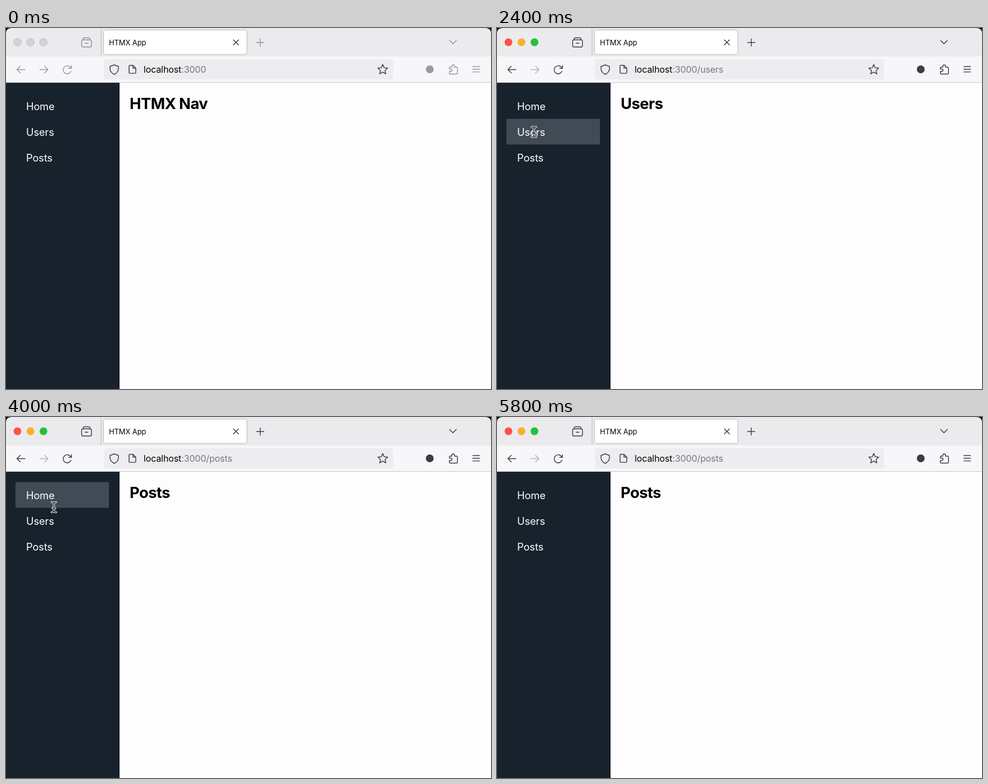
An HTML page for the animation above (5900 ms loop, 867 by 646 pixels).

```html
<!DOCTYPE html>
<html lang="en">
<head>
<meta charset="utf-8">
<title>HTMX App</title>
<style>
  html, body { margin: 0; width: 100%; height: 100%; overflow: hidden; background: #000; }
  svg { display: block; width: 867px; height: 646px; font-family: Inter, sans-serif; }
  .icon { fill: none; stroke: #3c3c42; stroke-width: 1.45; stroke-linecap: round; stroke-linejoin: round; }
  .nav { fill: #fff; font-size: 18.3px; letter-spacing: -.1px; }
</style>
</head>
<body>
<svg viewBox="0 0 867 646">
  <defs>
    <filter id="shadow" x="-5%" y="-20%" width="110%" height="140%">
      <feDropShadow dx="0" dy="0" stdDeviation="1.6" flood-color="#55555c" flood-opacity=".65"/>
    </filter>
    <clipPath id="window"><path d="M0 646V10Q0 0 10 0H857Q867 0 867 10V646Z"/></clipPath>
  </defs>
  <rect width="867" height="646"/>
  <g clip-path="url(#window)">
    <rect width="867" height="51" fill="#ebebee"/>
    <rect y="51" width="867" height="46" fill="#f7f7fa"/>
    <rect y="97" width="867" height="1" fill="#cbc8d3"/>
    <rect y="98" width="867" height="548" fill="#fdfdfd"/>
    <rect y="98" width="203" height="548" fill="#18222d"/>

    <g id="lights"></g>
    <path d="M170 0V50" stroke="#b9b9ae"/>
    <rect x="175" y="4.5" width="255" height="42" rx="4" fill="#fff" filter="url(#shadow)"/>
    <text x="184" y="31" font-size="13" letter-spacing="-.1">HTMX App</text>
    <path class="icon" d="M406.5 21.2l9 9m0-9l-9 9"/>
    <rect x="175" y="56" width="517" height="36" rx="4" fill="#ededf0"/>

    <g id="tools" class="icon">
      <path d="M138 20.5V19.5Q138 17.5 140 17.5H148Q150 17.5 150 19.5V20.5M141.5 27.3H146.5"/>
      <rect x="135.3" y="21.3" width="17.4" height="12.7" rx="2.2"/>
      <path d="M448 26H461M454.5 19.5V32.5"/>
      <path d="M793 22.2l6 6 6-6"/>
      <path d="M34 74.5H19.5m6-6l-6 6 6 6"/>
      <path d="M116.2 77.2a7.2 7.2 0 1 1-1.6-7.4l2 2M117 67.3V72.3H112"/>
      <circle cx="757.5" cy="74" r="7" fill="#3c3c42" stroke="none"/>
      <path d="M794 70H797V68.3a2.3 2.3 0 0 1 4.6 0V70H805.2Q807 70 807 71.8V80.7Q807 82.5 805.2 82.5H794.4Q792.6 82.5 792.6 80.7V77.7H795.2a2.1 2.1 0 0 0 0-4.2H792.6V71.4Q792.6 70 794 70Z"/>
      <path d="M834.5 69H846.5M834.5 73.8H846.5M834.5 78.6H846.5"/>
    </g>
    <path id="forward" class="icon" d="M60.5 74.5H75m-6-6l6 6-6 6"/>
    <g class="icon">
      <path d="M193.5 66L201 68.8V73.5Q200.5 79.5 193.5 83Q186.5 79.5 186 73.5V68.8Z"/>
      <path d="M227 66.7H221.5Q220 66.7 220 68.2V79.6Q220 81.1 221.5 81.1H230.5Q232 81.1 232 79.6V71.7ZL227 71.7H232"/>
      <path id="star"/>
    </g>
    <text x="246" y="80" font-size="16" letter-spacing="-.1">localhost<tspan id="path" fill="#77777b"></tspan></text>

    <rect id="hover" x="17" width="167" height="46" fill="#414b56"/>
    <text class="nav" x="36" y="146.5">Home</text>
    <text class="nav" x="36" y="192.5">Users</text>
    <text class="nav" x="36" y="238.5">Posts</text>
    <text id="heading" x="221" y="145" font-size="27.5" font-weight="700" letter-spacing="-.6"></text>

    <path id="arrow" d="M0 0V16.6L3.9 13L6.7 19.6L9.7 18.3L6.9 11.9H12.1Z" stroke="#fff" stroke-width="1.3" stroke-linejoin="round"/>
    <g id="beam" fill="none" stroke-linecap="round">
      <path d="M-4-9Q0-9 0-6Q0-9 4-9M0-6V6M-4 9Q0 9 0 6Q0 9 4 9M-2.5 2H2.5" stroke="#fff" stroke-width="3.4"/>
      <path d="M-4-9Q0-9 0-6Q0-9 4-9M0-6V6M-4 9Q0 9 0 6Q0 9 4 9M-2.5 2H2.5" stroke="#000" stroke-width="1.3"/>
    </g>
  </g>
</svg>
<script>
const LOOP = 5900, STEP = 100, FOCUS = 1000;
const $ = id => document.getElementById(id);
const show = (el, on) => el.setAttribute('visibility', on ? 'visible' : 'hidden');

const lights = [[20.5, '#ff5149'], [43.7, '#f8b02b'], [67, '#23c13b']].map(([x, color]) => {
  const dot = document.createElementNS('http://www.w3.org/2000/svg', 'circle');
  Object.entries({ cx: x, cy: 25.5, r: 6.9 }).forEach(([k, v]) => dot.setAttribute(k, v));
  $('lights').append(dot);
  return { dot, color };
});

const starPoints = Array.from({ length: 10 }, (_, i) => {
  const r = i % 2 ? 4.3 : 9.3, a = Math.PI * (i / 5 - .5);
  return `${673.5 + r * Math.cos(a)} ${74.6 + r * Math.sin(a)}`;
});
$('star').setAttribute('d', `M${starPoints.join('L')}Z`);

// Pointer stops: time, x, y
const route = [
  [100, 235, 640], [500, 62, 196], [600, 60, 190], [800, 65, 186], [1600, 65, 186],
  [2400, 66, 186], [2500, 66, 186], [2800, 66, 231], [3400, 66, 231], [3600, 64, 223],
  [3900, 76, 180], [4200, 113, 108], [4400, 136, 14]
];
const pages = [
  { from: 0, title: 'HTMX Nav', path: ':3000' },
  { from: 2000, title: 'Users', path: ':3000/users' },
  { from: 3200, title: 'Posts', path: ':3000/posts' }
];

function pointerAt(t) {
  const next = route.findIndex(stop => stop[0] > t);
  if (next < 1) return null;
  const [t0, x0, y0] = route[next - 1], [t1, x1, y1] = route[next];
  const k = (t - t0) / (t1 - t0), ease = k * k * (3 - 2 * k);
  return { x: x0 + (x1 - x0) * ease, y: y0 + (y1 - y0) * ease };
}

function render(time) {
  const t = Math.floor(time % LOOP / STEP) * STEP;
  const active = t >= FOCUS;
  lights.forEach(({ dot, color }) => {
    dot.setAttribute('fill', active ? color : '#d3d2d5');
    dot.setAttribute('stroke', active ? 'none' : '#c3c2c5');
  });
  $('tools').setAttribute('opacity', active ? 1 : .5);
  $('forward').setAttribute('opacity', active ? .36 : .5);

  const page = pages.filter(p => p.from <= t).pop();
  $('heading').textContent = page.title;
  $('path').textContent = page.path;

  const p = pointerAt(t);
  const row = p ? Math.max(0, Math.floor((p.y - 116.5) / 46)) : -1;
  const hovered = active && p && p.y > 100 && row < 3;
  show($('hover'), hovered);
  if (hovered) $('hover').setAttribute('y', 116.5 + row * 46);

  const overText = hovered && p.x < 87 && p.y > 120;
  show($('beam'), p && overText);
  show($('arrow'), p && !overText);
  if (p) $(overText ? 'beam' : 'arrow').setAttribute('transform', `translate(${p.x} ${p.y})`);
}

const start = performance.now();
function tick() {
  render(performance.now() - start);
  requestAnimationFrame(tick);
}
tick();
</script>
</body>
</html>
```
